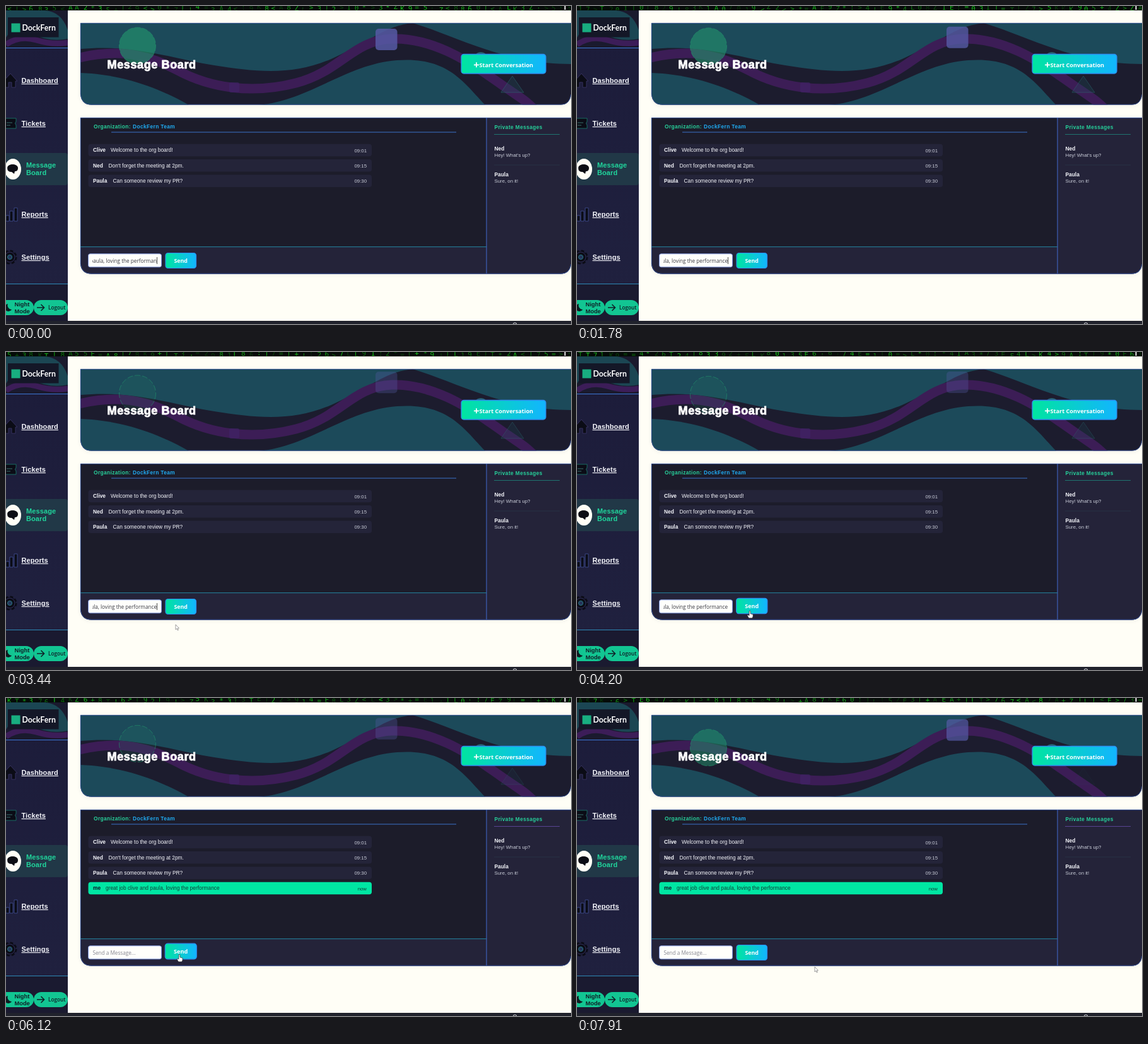
An HTML page that plays this animation: 896 by 504 pixels, repeating every 8 s.

```html
<!DOCTYPE html>
<html lang="en">
<head>
<meta charset="utf-8">
<title>Message Board</title>
<style>
  html, body { margin: 0; width: 100%; height: 100%; overflow: hidden; background: #fffef6; }
  svg { display: block; width: 100vw; height: 100vh; font-family: "Liberation Sans", Arial, sans-serif; }
  .b { font-weight: 700; }
  .ui { font-family: "Open Sans", "Noto Sans", sans-serif; }
  .nav { font-weight: 700; font-size: 11px; letter-spacing: .1px; fill: #f4f5fa; }
  .link { text-decoration: underline; }
  .head { font-weight: 700; font-size: 8.4px; letter-spacing: .38px; fill: #27cf9a; }
  .msg { font-size: 8.4px; fill: #f4f5fa; }
  .small { font-size: 7.8px; fill: #c9ccd8; }
  .end { text-anchor: end; }
  .mid { text-anchor: middle; }
</style>
</head>
<body>
<svg viewBox="0 0 896 504" preserveAspectRatio="none">
  <defs>
    <linearGradient id="action"><stop stop-color="#00e5a0"/><stop offset="1" stop-color="#12b5ff"/></linearGradient>
    <linearGradient id="side" x2="0" y2="1"><stop stop-color="#1c1c3a"/><stop offset="1" stop-color="#20213f"/></linearGradient>
    <clipPath id="strip"><rect width="896" height="6.5"/></clipPath>
    <clipPath id="hero"><path d="M118 27H896V140Q894 156.500 880 156.500H135Q120 156.500 118 140Z"/></clipPath>
    <clipPath id="board"><path d="M118 177H896V409Q894 424.500 880 424.500H135Q120 424.500 118 409Z"/></clipPath>
    <clipPath id="logoArea"><rect y="7" width="98" height="59"/></clipPath>
    <clipPath id="field"><rect x="137" y="393" width="103" height="21"/></clipPath>
    <filter id="shade" x="-5%" y="-10%" width="110%" height="125%"><feDropShadow dx="0" dy="1" stdDeviation="3" flood-opacity=".07"/></filter>
  </defs>

  <rect width="896" height="504" fill="#fffef6"/>
  <rect width="896" height="7" fill="#050b08"/>
  <g id="rain" clip-path="url(#strip)" font-family="DejaVu Sans Mono, monospace" font-size="11"></g>
  <path d="M886.500 0V6" stroke="#e8e8e8" stroke-width="2"/>
  <rect y="499" width="896" height="5" fill="#20222c"/>
  <circle cx="807" cy="505" r="3" fill="none" stroke="#d6d6dc"/>

  <!-- sidebar -->
  <rect y="7" width="98" height="492" fill="url(#side)"/>
  <g clip-path="url(#logoArea)">
    <rect y="7" width="98" height="59" fill="#1a1a2e"/>
    <path d="M0 7H62Q88 9 98 38V52Q70 58 40 44T0 50Z" fill="#1b4653"/>
    <path d="M0 61Q22 46 48 54T98 58" fill="none" stroke="#3c1d58" stroke-width="9"/>
  </g>
  <rect x="3" y="18" width="80.500" height="31.500" fill="#141727"/>
  <rect x="8.500" y="27.500" width="14" height="14" fill="#18ae80"/>
  <text x="25.500" y="38.500" font-family="Lato, sans-serif" font-size="12.300" class="b" fill="#fff">DockFern</text>
  <path d="M0 66.500H98" stroke="#3c78d8"/>
  <rect y="441" width="98" height="58" fill="#1a1a30"/>
  <path d="M0 440.500H98" stroke="#2d8ab8"/>
  <rect x="-6" y="233" width="104" height="51" rx="4" fill="#213847"/>
  <g id="nav"></g>

  <g stroke-width="1" stroke="#35305e" fill="#0b0c16">
    <path d="M-4 119L7 107L18 119H15V129H9V121H4V129H-4Z"/>
    <path d="M-2 178H16V183Q13 186 16 189V194H-2Z" stroke="#196a62"/>
    <path d="M1 185H10M1 189H7" stroke="#38706c"/>
    <path d="M0 332H5V341H0ZM6 325H11V341H6ZM13 320H18V341H13Z" stroke="#3b4686"/>
    <circle cx="6" cy="398" r="9.500" stroke="#0b0c16" stroke-width="4" stroke-dasharray="4.500 3"/>
    <circle cx="6" cy="398" r="8"/>
    <circle cx="6" cy="398" r="3.500" fill="#25345a" stroke="#287a83"/>
  </g>
  <ellipse cx="11" cy="258.500" rx="13" ry="16.500" fill="#fffef6"/>
  <path d="M2 257C2 249 19 249 19 257Q19 262 14 262L13 266L9 263Q2 263 2 257Z" fill="#0c0d14"/>

  <rect x="-12" y="466" width="56" height="24" rx="12" fill="#12c592"/>
  <rect x="44" y="466" width="54" height="24" rx="12" fill="#12c592"/>
  <path d="M3 472A6 6 0 1 0 9 481A6.500 6.500 0 0 1 3 472Z" fill="#0d1b20"/>
  <g fill="#102028" font-size="9.300" class="b"><text x="13.500" y="476">Night</text><text x="13.500" y="487">Mode</text></g>
  <path d="M49 478H60M55.500 473L60.500 478L55.500 483" fill="none" stroke="#102028" stroke-width="1.600"/>
  <text x="67" y="481" class="ui" font-size="8.200" font-weight="600" fill="#102028">Logout</text>

  <!-- hero -->
  <path d="M118 27H896V140Q894 156.500 880 156.500H135Q120 156.500 118 140Z" fill="#1a1a2d" filter="url(#shade)"/>
  <g clip-path="url(#hero)">
    <g fill="#1c4a5a">
      <path d="M118 27V68C205 60 265 84 330 94S455 112 520 82S600 32 645 27Z"/>
      <path d="M645 27C715 48 790 92 896 92V27Z"/>
      <path d="M118 106C180 108 240 128 290 157H118Z"/>
      <path d="M400 157C480 150 540 92 620 86S725 120 760 157Z"/>
    </g>
    <path d="M112 83C172 68 220 74 272 102S390 140 460 122S550 54 612 52S730 85 775 117S820 146 838 164" fill="none" stroke="#3c1d56" stroke-width="15"/>
    <circle id="disc" cx="208.500" r="29" fill="#23946d" stroke="#23946d" stroke-opacity=".6" stroke-dasharray="9 3"/>
    <rect id="tile" x="586" width="34.500" height="34" rx="5" fill="#565aa5"/>
    <circle cx="753" cy="84" r="11" fill="#276070"/>
    <path id="triangle" d="M803 111L821 137H785Z" fill="#20545f" fill-opacity=".35" stroke="#2c6a70" stroke-width=".7"/>
    <rect x="354" y="121" width="16" height="16" rx="3" fill="#42236a" opacity=".6"/>
  </g>
  <path d="M896 27.300H118.300V140Q120 156.200 135 156.200H880Q894 156.200 896 140" fill="none" stroke="#2f4f9c" stroke-width=".8"/>
  <text x="160.500" y="98.700" font-size="18.100" letter-spacing=".57" class="b" fill="#fff" stroke="#fff" stroke-width=".85">Message Board</text>
  <rect x="722" y="76.500" width="134" height="30.500" rx="4" fill="url(#action)" stroke="#2f8df0" stroke-width="1.300"/>
  <path d="M742 93.300H750M746 89.300V97.300" stroke="#fff" stroke-width="1.700"/>
  <text x="750.500" y="96.700" font-size="9.150" class="b ui" fill="#fff">Start Conversation</text>

  <!-- board -->
  <path d="M118 177H896V409Q894 424.500 880 424.500H135Q120 424.500 118 409Z" fill="#1a1a2b" filter="url(#shade)"/>
  <g clip-path="url(#board)" fill="#242339">
    <rect x="762" y="177" width="134" height="248"/>
    <rect x="118" y="382" width="644" height="43"/>
  </g>
  <g fill="none">
    <path d="M896 177.300H118.300V409Q120 424.200 135 424.200H880Q894 424.200 896 409" stroke="#3457ac" stroke-width=".8"/>
    <path d="M762 177V424" stroke="#426cd2"/>
    <path d="M118 381.700H762" stroke="#2688a3"/>
    <path d="M167 200H714" stroke="#3b73cb"/>
    <path id="rule" d="M774 203.500H878"/>
    <path d="M774 252H878" stroke="#2b3a4b" stroke-width=".6"/>
  </g>
  <text x="139" y="194" class="head">Organization:</text>
  <text x="201" y="194" class="head" style="fill:#20aaf0">DockFern Team</text>
  <text x="774.500" y="195" class="head">Private Messages</text>
  <g id="messages"></g>
  <g id="direct"></g>

  <rect x="130.500" y="392.800" width="116" height="21" rx="3" fill="#fffffb" stroke="#7f98e0"/>
  <g clip-path="url(#field)"><text id="draft" y="406.700" class="ui" font-size="8.200"></text></g>
  <path id="caret" d="M239.500 398V409" stroke="#222" stroke-width=".8"/>
  <g id="send">
    <rect x="253" y="391.500" width="48.500" height="24" rx="4" fill="url(#action)" stroke="#2f8df0" stroke-width="1.200"/>
    <text x="277.200" y="406.500" font-size="8.900" class="b ui mid" fill="#fff">Send</text>
  </g>
  <g id="pointer" stroke="#333" stroke-width=".7" fill="#fff">
    <path id="arrow" d="M0 0V8L1.900 6.300L3.200 9.200L4.400 8.600L3.200 5.800H5.500Z" stroke="#777"/>
    <path id="hand" d="M-1 0Q0-1.300 1 0V4L5 5V8.500L3.800 11H-1.500L-4 6.700Q-3.500 5-1 7Z"/>
  </g>
</svg>
<script>
const LOOP = 8000, SENT = 5800;
const $ = id => document.getElementById(id);
const set = (id, attrs) => Object.entries(attrs).forEach(([k, v]) => $(id).setAttribute(k, v));
const text = (x, y, cls, s, style = '') => `<text x="${x}" y="${y}" class="${cls}" style="${style}">${s}</text>`;
const note = 'great job clive and paula, loving the performance';

$('nav').innerHTML =
  [['Dashboard', 122], ['Tickets', 190], ['Reports', 334], ['Settings', 402]]
    .map(([s, y]) => text(24.5, y, 'nav link', s)).join('') +
  ['Message', 'Board'].map((s, i) => text(32, 256 + i * 12.3, 'nav', s, 'fill:#20d59c')).join('');

$('messages').innerHTML = [
  ['Clive', 166, 'Welcome to the org board!', '09:01'],
  ['Ned', 162.5, "Don't forget the meeting at 2pm.", '09:15'],
  ['Paula', 169.5, 'Can someone review my PR?', '09:30'],
  ['me', 158, note, 'now']
].map(([name, x, body, time], i) => {
  const y = 218.8 + i * 24.3, mine = name === 'me';
  const dark = mine ? 'fill:#103f38' : '';
  return `<g ${mine ? 'id="sent"' : ''}><rect x="130.500" y="${y}" width="449.500" height="19.500" rx="4" fill="${mine ? '#00e6a3' : '#242439'}"/>` +
    text(138, y + 12.5, 'msg b', name, mine ? 'fill:#10192a' : '') +
    text(x, y + 12.5, 'msg', body, dark) + text(572, y + 13, 'small end', time, dark) + '</g>';
}).join('');

$('direct').innerHTML = [['Ned', "Hey! What's up?"], ['Paula', 'Sure, on it!']].map(([name, body], i) =>
  text(774.5, 229 + i * 41, 'msg b', name) + text(774.5, 239.3 + i * 41, 'small', body)).join('');

// Piecewise smooth interpolation over [time, ...values] keys.
function track(keys, t) {
  const i = keys.findIndex(k => k[0] > t);
  if (i < 0) return keys.at(-1).slice(1);
  if (!i) return keys[0].slice(1);
  const a = keys[i - 1], b = keys[i], u = (t - a[0]) / (b[0] - a[0]), e = u * u * (3 - 2 * u);
  return a.slice(1).map((v, j) => v + (b[j + 1] - v) * e);
}

const path = [[3100, 262, 500], [3440, 269, 432], [4150, 274, 411], [4500, 275, 407],
  [6700, 275, 407], [7500, 377, 426]];
const glow = [[0, .65], [1800, .6], [2700, .12], [6000, .12], [7900, .5]];
const hover = [[4100, 0], [4300, 1], [6800, 1], [7000, 0]];

const hash = n => { const s = Math.sin(n * 127.1 + 11.7) * 43758.5453; return s - Math.floor(s); };
const glyphs = '0123456789TZ:=+*<>|LAEK';
$('rain').innerHTML = Array.from({ length: 75 }, (_, i) => `<text x="${i * 12 + hash(i) * 3}" y="${5 + hash(i + 90) * 5}"></text>`).join('');
const drops = [...$('rain').children];

function draw(t) {
  drops.forEach((drop, i) => {
    const beat = Math.floor(t / 800 + hash(i + 7));
    drop.textContent = glyphs[Math.floor(hash(i * 13 + beat) * glyphs.length)];
    const level = .25 + .75 * hash(i * 31 + beat * 3);
    drop.setAttribute('fill', `rgb(${20 * level},${200 * level},${25 * level})`);
  });

  const [alpha] = track(glow, t);
  set('disc', { cy: 63 + 16 * (t / 8000) ** 2, 'fill-opacity': alpha });
  set('tile', { y: 31 + 5 * ((t - 4500) / 4500) ** 2, opacity: .2 + alpha });
  set('triangle', { opacity: track([[0, .8], [5500, .5], [7000, .1]], t)[0] });
  set('rule', { stroke: t < SENT ? '#1f746f' : '#594494' });

  const sent = t >= SENT;
  const typed = note.slice(0, t < 110 ? -2 : t < 220 ? -1 : undefined);
  $('sent').style.display = sent ? '' : 'none';
  $('draft').textContent = sent ? 'Send a Message...' : typed;
  set('draft', { x: sent ? 137.5 : 239, 'text-anchor': sent ? 'start' : 'end', fill: sent ? '#858591' : '#3b3b45' });
  $('caret').style.display = !sent && (t + 250) % 900 < 450 ? '' : 'none';

  const [lift] = track(hover, t);
  set('send', { transform: `translate(277.2 ${403.5 - 2 * lift}) scale(${1 + .03 * lift}) translate(-277.2 -403.5)` });

  const [x, y] = track(path, t), pressing = t > 4100 && t < 6900;
  set('pointer', { transform: `translate(${x} ${y})` });
  $('pointer').style.display = t < 3100 ? 'none' : '';
  $('arrow').style.display = pressing ? 'none' : '';
  $('hand').style.display = pressing ? '' : 'none';
}

const start = performance.now();
function frame() {
  draw((performance.now() - start) % LOOP);
  requestAnimationFrame(frame);
}
frame();
</script>
</body>
</html>
```
